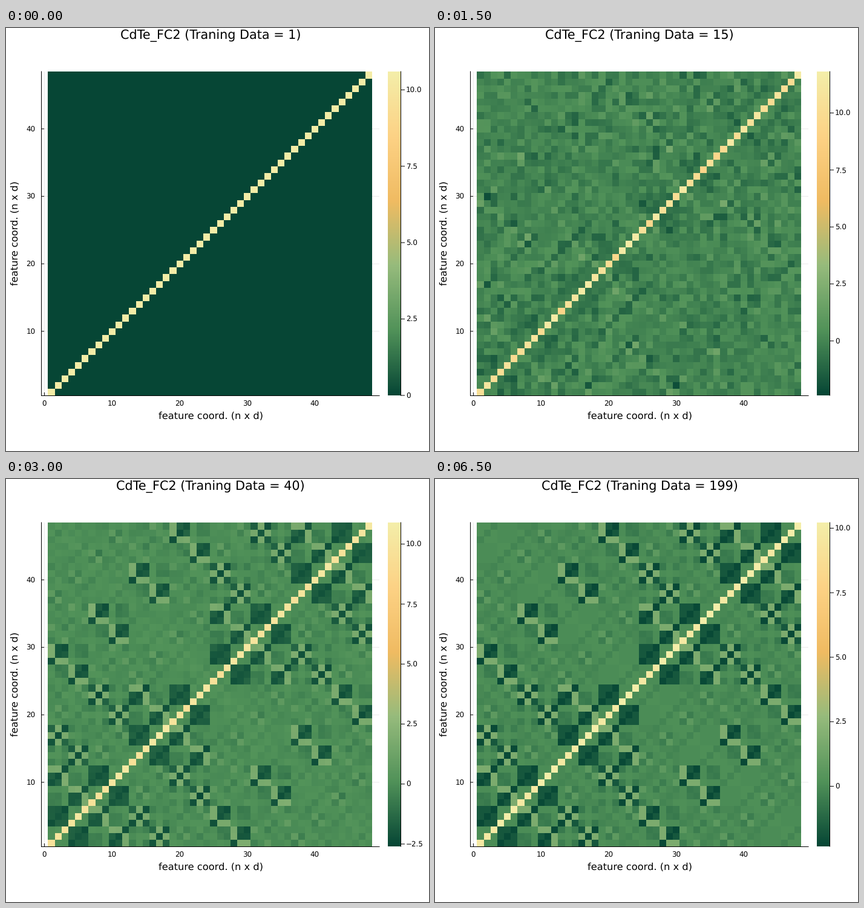
A matplotlib script that plays this animation: 699 px wide and 700 px high, repeating every 7000 ms.

```python
import itertools

import numpy as np
import matplotlib.pyplot as plt
from matplotlib.animation import FuncAnimation
from matplotlib.colors import LinearSegmentedColormap

W, H, DPI = 699, 700, 64
LEFT, RIGHT, TOP, BOTTOM = 69, 605, 72, 608
SIZE, SPAN = 48, BOTTOM - TOP

TRAINING = [1, 5, 10, 15, 20, 30, 40, 50, 60, 80, 100, 125, 150, 199]

# colour range at a few training sizes: size, lowest, highest
RANGE = np.array([(1, 0, 10.6), (5, -1.2, 11.87), (15, -2.39, 11.82),
                  (20, -2.56, 11.7), (30, -2.51, 11.37), (40, -2.6, 10.9),
                  (50, -2.37, 10.4), (100, -2.33, 10.22)]).T

CMAP = LinearSegmentedColormap.from_list(
    "fall", ["#064635", "#519259", "#96bb7c", "#f0bb62", "#fdd285", "#f4eea9"], N=512)

# fcc lattice vectors, fastest cell index first
CELL = np.array([[.5, .5, 0], [.5, 0, .5], [0, .5, .5]])


def pair_block(d, hetero):
    """3x3 coupling summed over periodic images of one atom pair."""
    shift = np.full(3, .25 if hetero else 0)
    base = np.array([d & 1, d >> 1 & 1, d >> 2 & 1])
    block = np.zeros((3, 3))
    for m in itertools.product((-1, 0, 1), repeat=3):
        r = shift + (base + 2 * np.array(m)) @ CELL
        dist = r @ r
        outer = np.outer(r, r) / max(dist, 1e-9)
        if hetero and dist < 0.2:
            block += -5.25 * outer - 0.45 * np.eye(3)
        elif hetero and dist < 0.7:
            block += -0.25 * outer
        elif not hetero and 0.1 < dist < 0.6:
            block += -0.62 * outer + 0.06 * np.eye(3)
    return block


def force_constants():
    full = np.zeros((SIZE, SIZE))
    for a, b in itertools.product(range(16), repeat=2):
        block = pair_block(a // 2 ^ b // 2, a % 2 != b % 2)
        if a == b:
            block = np.eye(3) * (10.2 if a % 2 else 9.85)
        full[3 * a:3 * a + 3, 3 * b:3 * b + 3] = block
    return full


def sym_noise(rng):
    g = rng.standard_normal((SIZE, SIZE))
    return (g + g.T) / np.sqrt(2)


rng = np.random.default_rng(12)
TRUE = force_constants()
NOISE_A, NOISE_B = sym_noise(rng), sym_noise(rng)
DIAG = np.arange(SIZE)
PIXEL_CELL = np.arange(SPAN) * SIZE // SPAN


def colour_range(n):
    return np.interp(n, RANGE[0], RANGE[1]), np.interp(n, RANGE[0], RANGE[2])


def estimate(k):
    """Noisy couplings that converge to the true ones as data grows."""
    n = TRAINING[k]
    share = 1 - np.exp(-(n / 22) ** 2)
    level = 0.55 * (1 - np.exp(-(n - 1) / 4)) * np.sqrt(1 - share)
    noise = np.cos(0.25 * k) * NOISE_A + np.sin(0.25 * k) * NOISE_B
    data = share * TRUE + level * noise
    if n == 1:
        data[:] = 0
    start = colour_range(n)[1] - (0.15 if n == 1 else 0.9)
    wobble = np.clip(level * 1.1 * noise[DIAG, DIAG], -1.3, 0.9)
    data[DIAG, DIAG] = start + share * (TRUE[DIAG, DIAG] - start) + wobble
    return data


def to_pixels(data):
    return data[::-1][np.ix_(PIXEL_CELL, PIXEL_CELL)]


plt.rcParams["font.family"] = "DejaVu Sans"
plt.rcParams["text.hinting"] = "none"
fig = plt.figure(figsize=(W / DPI, H / DPI), dpi=DPI, facecolor="white")
ax = fig.add_axes([0, 0, 1, 1])


def text(x, y, s, px, ha="center", **kw):
    return ax.text(x, y, s, fontsize=px * 72 / DPI, color="black",
                   ha=ha, va="baseline", **kw)


def line(xs, ys, px=1.0, **kw):
    return ax.plot(xs, ys, color="black", lw=px * 72 / DPI, snap=False,
                   solid_capstyle="butt", **kw)[0]


def image(data, x0, x1):
    return ax.imshow(data, cmap=CMAP, aspect="auto", interpolation="nearest",
                     extent=(x0, x1, BOTTOM, TOP), zorder=2)


def cell_x(v):
    return LEFT + (v - 0.5) * SPAN / SIZE


def cell_y(v):
    return BOTTOM - (v - 0.5) * SPAN / SIZE


for v in range(0, 50, 10):
    x = cell_x(v)
    line([x, x], [TOP, BOTTOM], 0.8, alpha=0.1, zorder=1)
    line([x, x], [603, 608], zorder=1)
    text(x, 625.5, str(v), 11.85)
    if v:
        y = cell_y(v)
        line([58, 617], [y, y], 0.8, alpha=0.1, zorder=1)
        line([58, 63], [y, y], zorder=1)
        text(48.5, y + 4.5, str(v), 11.85, ha="right")

heat = image(to_pixels(estimate(0)), LEFT, RIGHT)
image(np.linspace(1, 0, SPAN)[:, None], 631, 652)
line([58.5, 58.5], [71.5, 609], zorder=3)
line([58, 617.5], [608.5, 608.5], zorder=3)
line([652.5, 652.5], [71.5, 608.5], zorder=3)

title = text(338, 18, "", 20.7)
text(338, 646.5, "feature coord. (n x d)", 16.3)
text(20, 340, "feature coord. (n x d)", 16.3, rotation=90, rotation_mode="anchor")

bar_ticks = []
for v in np.arange(-2.5, 10.1, 2.5):
    label = f"{v:.1f}".replace("-", "\u2212") if v else "0"
    bar_ticks.append((v, line([652, 659], [0, 0], zorder=3),
                      text(661, 0, label, 11.85, ha="left")))

ax.set_xlim(0, W)
ax.set_ylim(H, 0)
ax.axis("off")


def draw(k):
    lo, hi = colour_range(TRAINING[k])
    heat.set_data(to_pixels(estimate(k)))
    heat.set_clim(lo, hi)
    title.set_text(f"CdTe_FC2 (Traning Data = {TRAINING[k]})")
    for v, tick, label in bar_ticks:
        y = BOTTOM - (v - lo) / (hi - lo) * SPAN
        tick.set_ydata([y, y])
        label.set_y(y + 4.5)
        for part in (tick, label):
            part.set_visible(lo <= v <= hi)
    return []


anim = FuncAnimation(fig, draw, frames=len(TRAINING), interval=500,
                     repeat=True, repeat_delay=0, blit=False)
plt.show()
```
